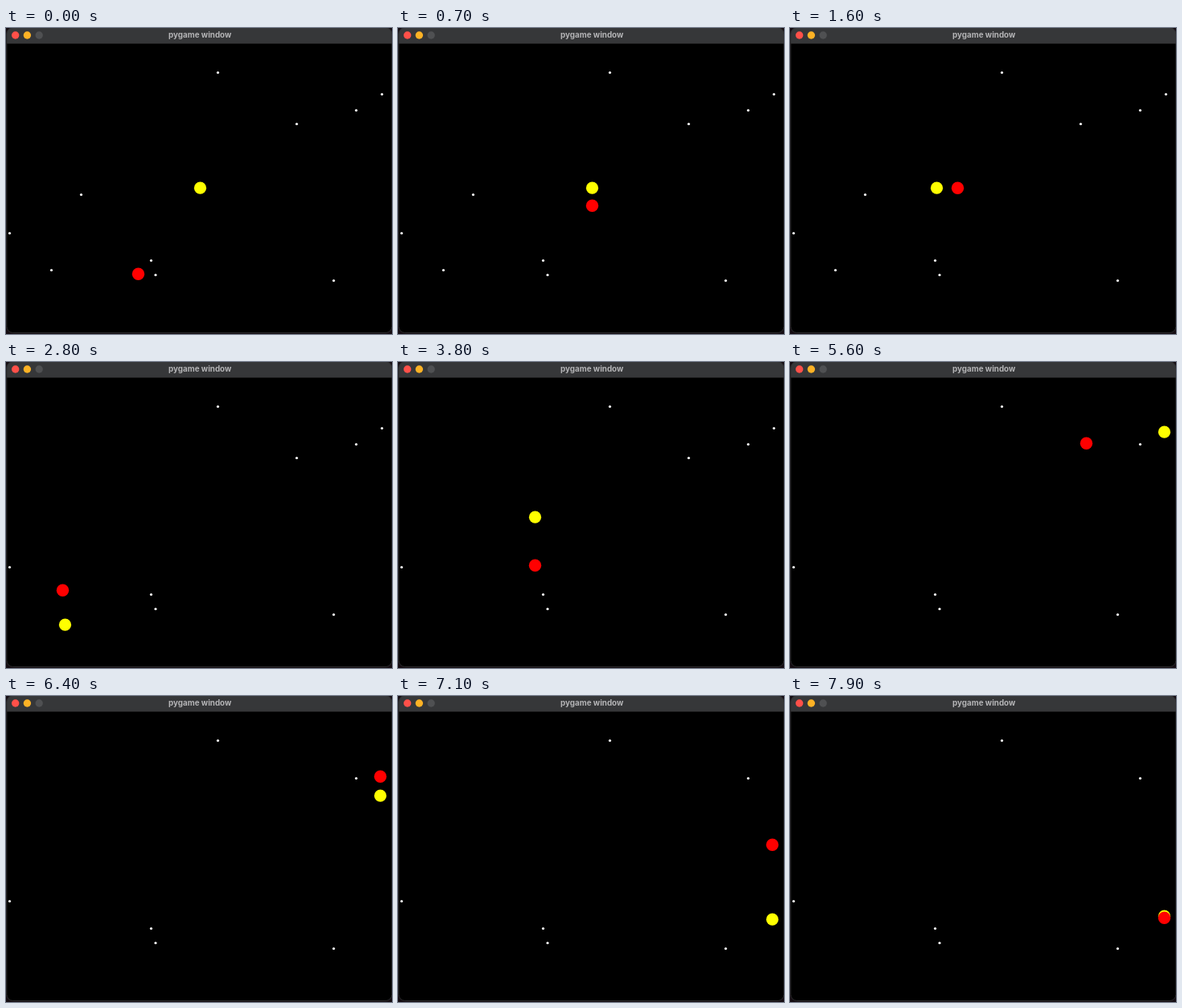
These frames come from a looping animation (480 by 381 pixels, 8000 ms). An HTML page:

```html
<!DOCTYPE html>
<html lang="en">
<head>
<meta charset="utf-8">
<title>pygame window</title>
<style>
  html, body { margin: 0; width: 100%; height: 100%; overflow: hidden; background: #000; }
  svg { display: block; width: 100vw; height: 100vh; }
  text { font: 700 9.8px Inter, sans-serif; fill: #b4b4b6; text-anchor: middle; }
</style>
</head>
<body>
<svg viewBox="0 0 480 381">
  <defs>
    <clipPath id="frame"><rect x="0.8" y="-0.5" width="479.2" height="380" rx="8"/></clipPath>
  </defs>
  <rect width="480" height="381" fill="#140c12"/>
  <g clip-path="url(#frame)">
    <rect width="480" height="381"/>
    <rect width="480" height="19.5" fill="#363739"/>
  </g>
  <rect x="0.8" y="-0.5" width="479.2" height="380" rx="8" fill="none" stroke="#2c2c2e"/>
  <circle cx="11.7" cy="9" r="4.7" fill="#ff5049"/>
  <circle cx="26.4" cy="9" r="4.7" fill="#fdb225"/>
  <circle cx="41.2" cy="9" r="4.7" fill="#4f5052"/>
  <text x="241.2" y="12.3">pygame window</text>
  <g id="stars" fill="#fff"></g>
  <circle id="player" r="7.6" fill="#ff0"/>
  <circle id="chaser" r="7.7" fill="#f00"/>
</svg>
<script>
const LOOP = 8000, FRAME = 100, TICK = 10;
const PLAYER_SPEED = 0.22, CHASER_SPEED = 0.121; // px per ms
const PICKUP_DISTANCE = 10;

const STARS = [
  [263, 55], [467, 82], [435, 102], [361, 119], [93, 207],
  [4, 255], [56, 301], [180, 289], [185.5, 307], [407, 314]
];

// Arrow keys held by the player: pressed, released, direction
const KEYS = [
  [1330, 2140, "left"], [2105, 2687, "down"], [2755, 3240, "right"],
  [3190, 4135, "up"], [3965, 4145, "right"], [4280, 5445, "right"],
  [5455, 5678, "up"], [6155, 7490, "down"], [7490, 7900, "up"]
];
const DIRECTIONS = { left: [-1, 0], right: [1, 0], up: [0, -1], down: [0, 1] };

const clamp = (value, low, high) => Math.min(high, Math.max(low, value));

function playerAt(t) {
  let x = 241, y = 199;
  for (const [pressed, released, name] of KEYS) {
    const travel = (clamp(t, pressed, released) - pressed) * PLAYER_SPEED;
    x += DIRECTIONS[name][0] * travel;
    y += DIRECTIONS[name][1] * travel;
  }
  return [x, y];
}

// The chaser closes in on each axis independently; the player collects stars.
function simulate() {
  const frames = [];
  const reach = CHASER_SPEED * TICK;
  let chaser = [164, 306];
  let left = STARS.map(() => true);
  for (let t = 0; t < LOOP; t += TICK) {
    const player = playerAt(t);
    if (t > 0) chaser = chaser.map((v, axis) => v + clamp(player[axis] - v, -reach, reach));
    left = left.map((there, i) => there &&
      Math.hypot(player[0] - STARS[i][0], player[1] - STARS[i][1]) > PICKUP_DISTANCE);
    if (t % FRAME === 0) frames.push({ player, chaser, left });
  }
  return frames;
}

// Positions sit on whole pixels, so shapes are centred on pixel middles.
function place(node, [x, y]) {
  node.setAttribute("cx", Math.round(x) + 0.5);
  node.setAttribute("cy", Math.round(y) + 0.2);
}

function makeStar([x, y]) {
  const node = document.createElementNS("http://www.w3.org/2000/svg", "circle");
  node.setAttribute("cx", x + 0.5);
  node.setAttribute("cy", y + 0.5);
  node.setAttribute("r", 1.6);
  document.getElementById("stars").append(node);
  return node;
}

const frames = simulate();
const stars = STARS.map(makeStar);
const player = document.getElementById("player");
const chaser = document.getElementById("chaser");
const start = performance.now();

function draw(now) {
  const elapsed = Math.max(0, now - start) % LOOP;
  const frame = frames[Math.floor(elapsed / FRAME)];
  place(player, frame.player);
  place(chaser, frame.chaser);
  stars.forEach((node, i) => { node.style.display = frame.left[i] ? "" : "none"; });
  requestAnimationFrame(draw);
}
draw(start);
</script>
</body>
</html>
```
